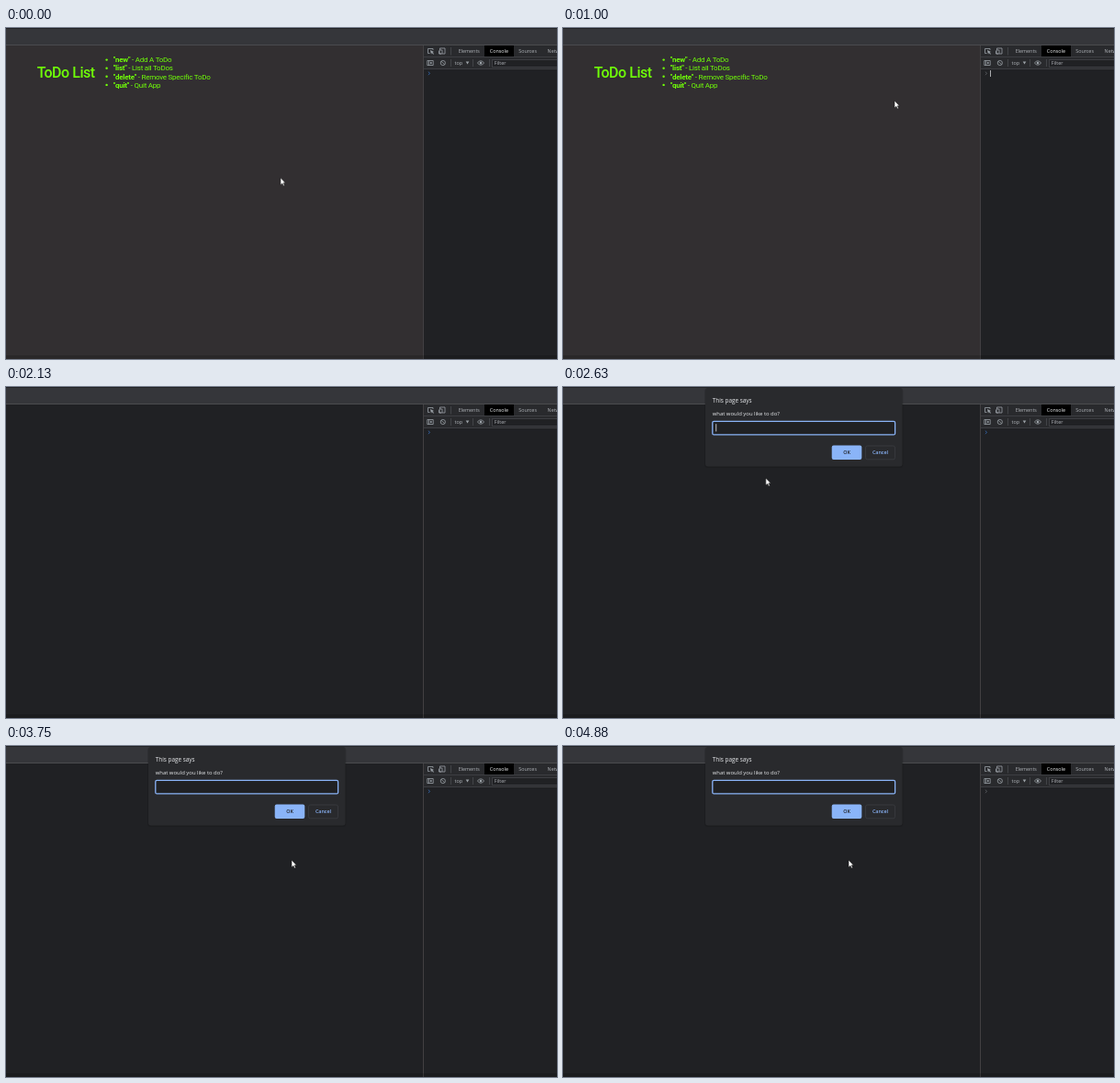
An HTML page that plays this animation: 600 by 360 pixels, repeating every 5.01 s.

```html
<!DOCTYPE html>
<html lang="en">
<head>
<meta charset="utf-8">
<title>ToDo List</title>
<style>
  html, body { margin: 0; width: 100%; height: 100%; overflow: hidden; background: #202124; }
  svg { display: block; width: 600px; height: 360px; }

  text { font-family: "Open Sans", "Noto Sans", sans-serif; font-size: 5.4px; fill: #b0b4b9; }
  .todo text { font-family: Roboto, sans-serif; font-size: 8px; letter-spacing: -.24px; fill: #70ff08; }
  .todo .title { font-size: 16px; font-weight: 500; letter-spacing: -.47px; }
  .todo tspan { font-weight: 700; }
  .todo circle { fill: #70ff08; }
  .icon { fill: none; stroke: #9aa0a6; stroke-width: .8; }
  .sep { stroke: #4a4c50; stroke-width: .8; }
  .mid { text-anchor: middle; font-weight: 600; }

  .todo, .dialog, .caret, .field-caret, .prompt, .pointer {
    animation: 5010ms step-end infinite;
  }
  .todo { animation-name: todo; }
  .dialog { animation-name: dialog; }
  .caret { animation-name: caret; }
  .field-caret { animation-name: field-caret; }
  .prompt { animation-name: prompt; fill: none; stroke-width: .9; }
  .pointer { animation-name: pointer; }

  @keyframes todo { 0% { opacity: 1; } 42.51%, 100% { opacity: 0; } }
  @keyframes dialog { 0% { opacity: 0; } 44.91%, 100% { opacity: 1; } }
  @keyframes caret {
    0%, 22.55%, 42.51%, 100% { opacity: 0; }
    12.57%, 32.53% { opacity: 1; }
  }
  @keyframes field-caret {
    0%, 44.91%, 64.87%, 84.83% { opacity: 1; }
    54.89%, 74.85%, 94.81%, 100% { opacity: 0; }
  }
  @keyframes prompt {
    0%, 29.94% { stroke: #3467ad; }
    17.56%, 89.82%, 100% { stroke: #5c5f64; }
  }
  @keyframes pointer {
    0% { transform: translate(298.9px, 162.8px); opacity: 1; }
    2.59% { transform: translate(301px, 160px); }
    4.99% { transform: translate(309px, 149px); }
    7.58% { transform: translate(322px, 131px); }
    9.98% { transform: translate(337px, 110px); }
    12.57% { transform: translate(349px, 92px); }
    14.97% { transform: translate(357px, 84px); }
    17.56% { transform: translate(360px, 80px); }
    19.96% { transform: translate(361px, 79px); opacity: 1; }
    22.55% { transform: translate(139px, 31px); opacity: 0; }
    47.5% { transform: translate(122px, 55px); opacity: 1; }
    49.9% { transform: translate(182px, 83px); }
    52.49% { transform: translate(220.8px, 99px); }
    54.89% { transform: translate(240px, 107px); }
    57.48% { transform: translate(267px, 115px); }
    59.88% { transform: translate(291px, 121px); }
    62.47% { transform: translate(306px, 123.3px); }
    64.87%, 100% { transform: translate(311px, 124px); opacity: 1; }
  }
</style>
</head>
<body>
<svg viewBox="0 0 600 360">
  <rect width="600" height="360" fill="#202124"/>

  <g class="todo">
    <rect y="19" width="454" height="341" fill="#322f31"/>
    <text class="title" x="33.8" y="53.5">ToDo List</text>
    <circle cx="109.6" cy="34.6" r="1.2"/>
    <circle cx="109.6" cy="43.7" r="1.2"/>
    <circle cx="109.6" cy="52.8" r="1.2"/>
    <circle cx="109.6" cy="61.9" r="1.2"/>
    <text x="116.8" y="37.3"><tspan>"new"</tspan> - Add A ToDo</text>
    <text x="116.8" y="46.4"><tspan>"list"</tspan> - List all ToDos</text>
    <text x="116.8" y="55.5"><tspan>"delete"</tspan> - Remove Specific ToDo</text>
    <text x="116.8" y="64.6"><tspan>"quit"</tspan> - Quit App</text>
  </g>

  <!-- browser bar -->
  <rect width="600" height="18" fill="#35363a"/>
  <rect width="600" height="1" fill="#222326"/>
  <rect y="18" width="600" height="1" fill="#4a4b4e"/>

  <!-- developer tools -->
  <g>
    <rect x="455" y="19" width="145" height="26" fill="#292a2d"/>
    <rect x="455" y="31" width="145" height="1" fill="#3d3e42"/>
    <rect x="455" y="44" width="145" height="1" fill="#3d3e42"/>
    <rect x="454" y="19" width="1" height="341" fill="#424042"/>
    <rect x="521" y="19" width="32" height="12" fill="#000"/>

    <text x="492.7" y="27.2">Elements</text>
    <text x="526.8" y="27.2" style="fill:#f1f3f4">Console</text>
    <text x="558.2" y="27.2">Sources</text>
    <text x="589.6" y="27.2">Network</text>

    <path class="icon" d="M465 24V22.5H459.5V27.5H461.5M471.5 25V28H474M472.5 24V22H478V28H475V24H472V28H475"/>
    <path d="M462 24 466 26 464.5 26.4 466 28 465.3 28.7 463.8 27.1 463 28.4Z" fill="#9aa0a6"/>
    <path class="icon" d="M458.8 35.5H465.2V40.5H458.8ZM460.5 35.5V40.5"/>
    <path d="M462 36.6 464.2 38 462 39.4Z" fill="#9aa0a6"/>
    <circle class="icon" cx="475.8" cy="38" r="2.6"/>
    <path class="icon" d="M474 36.2 477.6 39.8"/>
    <path class="sep" d="M484.5 21V29.5M484.5 34V42M508.5 34V42M526.5 34V42"/>
    <text x="488.6" y="40">top</text>
    <path d="M500.7 36.4H504.3L502.5 39.4Z" fill="#9aa0a6"/>
    <path class="icon" d="M513.4 38Q517 33.6 520.6 38Q517 42.4 513.4 38Z"/>
    <circle cx="517" cy="38" r="1.3" fill="#9aa0a6"/>
    <rect x="529.5" y="34.5" width="80" height="8" fill="#202124" stroke="#3d3e42"/>
    <text x="531.8" y="40.4">Filter</text>

    <path class="prompt" d="M459.8 47.6 461.6 49.3 459.8 51"/>
    <rect class="caret" x="465.2" y="46" width=".8" height="7" fill="#d0d1d4"/>
  </g>

  <rect y="356" width="600" height="4" opacity=".15"/>

  <g class="dialog">
    <rect x="154" y="1" width="216.5" height="87" rx="4" opacity=".12"/>
    <rect x="155" y="1" width="214.5" height="85.5" rx="3" fill="#292a2d"/>
    <text x="162.7" y="17.2" style="font-size:6.4px;fill:#e8eaed">This page says</text>
    <text x="162.7" y="30.5" style="font-size:5.93px;fill:#e8eaed">what would you like to do?</text>
    <rect x="162.8" y="37.3" width="198.8" height="14.6" rx="1.5" fill="#202124" stroke="#8ab4f8" stroke-width="1.3"/>
    <rect class="field-caret" x="166.3" y="40.2" width=".9" height="8.2" fill="#d0d2d6"/>
    <rect x="292.7" y="63.6" width="32.6" height="15.4" rx="2" fill="#8ab4f8"/>
    <text class="mid" x="309" y="73.3" style="fill:#202124">OK</text>
    <rect x="329.5" y="64" width="32" height="14.8" rx="2" fill="none" stroke="#3a3d42" stroke-width=".8"/>
    <text class="mid" x="345.5" y="73.3" style="fill:#8ab4f8">Cancel</text>
  </g>

  <path class="pointer" d="M0 0V7.9L1.9 6.2 3.1 8.9 4.4 8.3 3.2 5.7H5.4Z" fill="#fff" stroke="#111" stroke-width=".5"/>
</svg>
</body>
</html>
```
